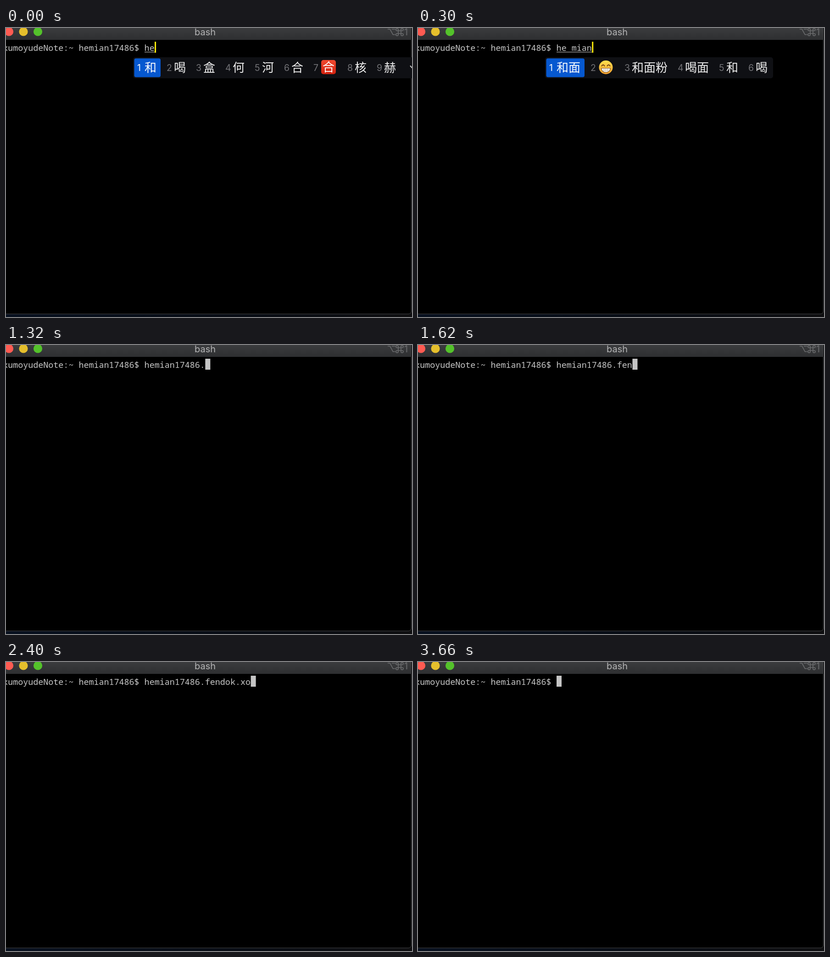
An HTML page for the animation above (3.72 s loop, 885x632 px).

```html
<!DOCTYPE html>
<html lang="zh">
<head>
<meta charset="utf-8">
<title>Terminal typing</title>
<style>
html, body { margin: 0; width: 100%; height: 100%; overflow: hidden; background: #000; }
svg { display: block; }
text { white-space: pre; }
.mono { font: 18.38px "Noto Sans Mono", "DejaVu Sans Mono", monospace; fill: #c7c7c7; }
.ui { font: 20px Inter, Roboto, sans-serif; }
.num { font: 19.5px Inter, Roboto, sans-serif; fill: #727276; }
.han { font: 500 26px "Noto Sans CJK SC", "Noto Sans CJK", sans-serif; fill: #f0f0f0; }
.num.on, .han.on { fill: #fff; }
</style>
</head>
<body>
<svg width="885" height="632" viewBox="0 0 885 632">
  <defs>
    <linearGradient id="bar" x2="0" y2="1">
      <stop stop-color="#3b3c3e"/><stop offset="1" stop-color="#2e2f31"/>
    </linearGradient>
    <linearGradient id="desk">
      <stop stop-color="#07101f"/><stop offset=".6" stop-color="#080c14"/><stop offset="1" stop-color="#0e0e10"/>
    </linearGradient>
    <linearGradient id="red" x2="0" y2="1">
      <stop stop-color="#f0492f"/><stop offset="1" stop-color="#d3220f"/>
    </linearGradient>
    <linearGradient id="gold" x2="0" y2="1">
      <stop stop-color="#ffe04f"/><stop offset="1" stop-color="#f3a02f"/>
    </linearGradient>
  </defs>
  <rect width="885" height="632" fill="url(#desk)"/>
  <path d="M0 0H884V620Q884 626 878 626H0Z"/>
  <path d="M0 625.3H877Q883.5 625.3 883.5 619V0" fill="none" stroke="#48494b"/>
  <rect width="884" height="26" fill="url(#bar)"/>
  <circle cx="6.5" cy="8" r="9.6" fill="#ff5b52"/>
  <circle cx="38" cy="8" r="9.6" fill="#e5bf2c"/>
  <circle cx="69.5" cy="8" r="9.6" fill="#54c22b"/>
  <text class="ui" x="434" y="16" text-anchor="middle" fill="#b5b5b6">bash</text>
  <g fill="none" stroke="#6c6d6f" stroke-width="1.6">
    <path d="M832 2.5h5l6.500 12h5M841 2.500h7.500"/>
    <path d="M855 6h6v6h-6zM855 6h-2.500a2.500 2.500 0 1 1 2.500-2.500zM861 6v-2.500a2.500 2.500 0 1 1 2.500 2.500zM861 12h2.500a2.500 2.500 0 1 1-2.500 2.500zM855 12v2.500a2.500 2.500 0 1 1-2.500-2.500z"/>
  </g>
  <text class="ui" x="868" y="16" fill="#6c6d6f">1</text>
  <g id="term"></g>
</svg>
<script>
const LOOP = 3720, CELL = 11.03, START = 302;
const PROMPT = 'xumoyudeNote:~ hemian17486$ ';
const LINE = 'hemian17486.fendok.xo', COMMIT = 480, FIRST = 6;
const KEYS = [780, 840, 900, 960, 1140, 1320, 1440, 1500, 1620, 1680, 1800, 1920, 2040, 2160, 2280];
const ERASE = 2580, REPEAT = 2820;

// Input method stages: start time, spelling, candidates
const SEAL = 'seal', GRIN = 'grin';
const PHRASES = ['和面', GRIN, '和面粉', '喝面', '和', '喝'];
const STAGES = [
  [0, 'he', ['和', '喝', '盒', '何', '河', '合', SEAL, '核', '赫']],
  [60, 'he m', ['和美', '河马', '何妹', '和', '喝', '盒', '何']],
  [180, 'he mi', ['和睦', '河米', '和', '喝', '盒', '何']],
  [240, 'he mia', PHRASES],
  [300, 'he mian', PHRASES]
];

const rect = (x, y, w, h, fill, r = 0) =>
  `<rect x="${x}" y="${y}" width="${w}" height="${h}" rx="${r}" fill="${fill}"/>`;
const label = (x, y, cls, s) => `<text x="${x}" y="${y}" class="${cls}">${s}</text>`;

const icons = {
  [SEAL]: x => rect(x + 1, 70, 32, 31, 'url(#red)', 5) + label(x + 4, 95, 'han on', '合'),
  [GRIN]: x => `<g transform="translate(${x + 17.5} 86)">
    <circle r="15" fill="url(#gold)"/>
    <path d="M-9-3q3-5 6 0M3-3q3-5 6 0" fill="none" stroke="#6b3d10" stroke-width="2" stroke-linecap="round"/>
    <path d="M-10 2H10Q9 11 0 11T-10 2Z" fill="#fff" stroke="#7a4a16" stroke-width="1.2"/>
    <path d="M-9 6H9M-4 2V10M0 2V11M4 2V10" stroke="#b9a58c" stroke-width=".8"/></g>`
};

function candidates(list) {
  let x = 286, end, items = '';
  list.forEach((word, i) => {
    const on = i ? '' : ' on', icon = icons[word];
    const w = icon ? 36 : 26 * word.length;
    if (!i) items += rect(279.5, 66.5, w + 31.5, 41, '#0658d0', 4);
    items += label(x, 94, 'num' + on, i + 1);
    items += icon ? icon(x + 16) : label(x + 16, 95.5, 'han' + on, word);
    end = x + w + 28;
    x += w + 38;
  });
  if (end > 840) {
    end = 895;
    items += '<path d="M881 82.500l5 5.500" stroke="#d0d0d0" stroke-width="2"/>';
  }
  return rect(277, 64, end - 277, 46, '#0f1014', 5) + items;
}

function typed(t) {
  if (t >= REPEAT) return LINE.slice(0, Math.max(0, 15 - 5 * Math.floor((t - REPEAT) / 60)));
  if (t >= ERASE) return LINE.slice(0, -1);
  return LINE.slice(0, FIRST + KEYS.filter(k => k <= t).length);
}

function scene(t) {
  const stage = t < COMMIT && STAGES.filter(s => s[0] <= t).pop();
  const text = stage ? stage[1] : typed(t);
  const w = text.length * CELL, x = START + w;
  let out = label(START - PROMPT.length * CELL, 49.5, 'mono', PROMPT + text);
  if (stage) {
    out += rect(START, 52, w, 1.2, '#b5b5b5') + rect(x, 30, 3, 24, '#fdea0a');
    out += candidates(stage[2]);
  } else {
    out += rect(x, 30, 11, 24, '#c5c5c5');
  }
  return out;
}

const term = document.getElementById('term');
let shown = '';
function draw(now) {
  const next = scene(now % LOOP);
  if (next !== shown) term.innerHTML = shown = next;
}
const t0 = performance.now();
function tick() {
  draw(performance.now() - t0);
  requestAnimationFrame(tick);
}
tick();
</script>
</body>
</html>
```
